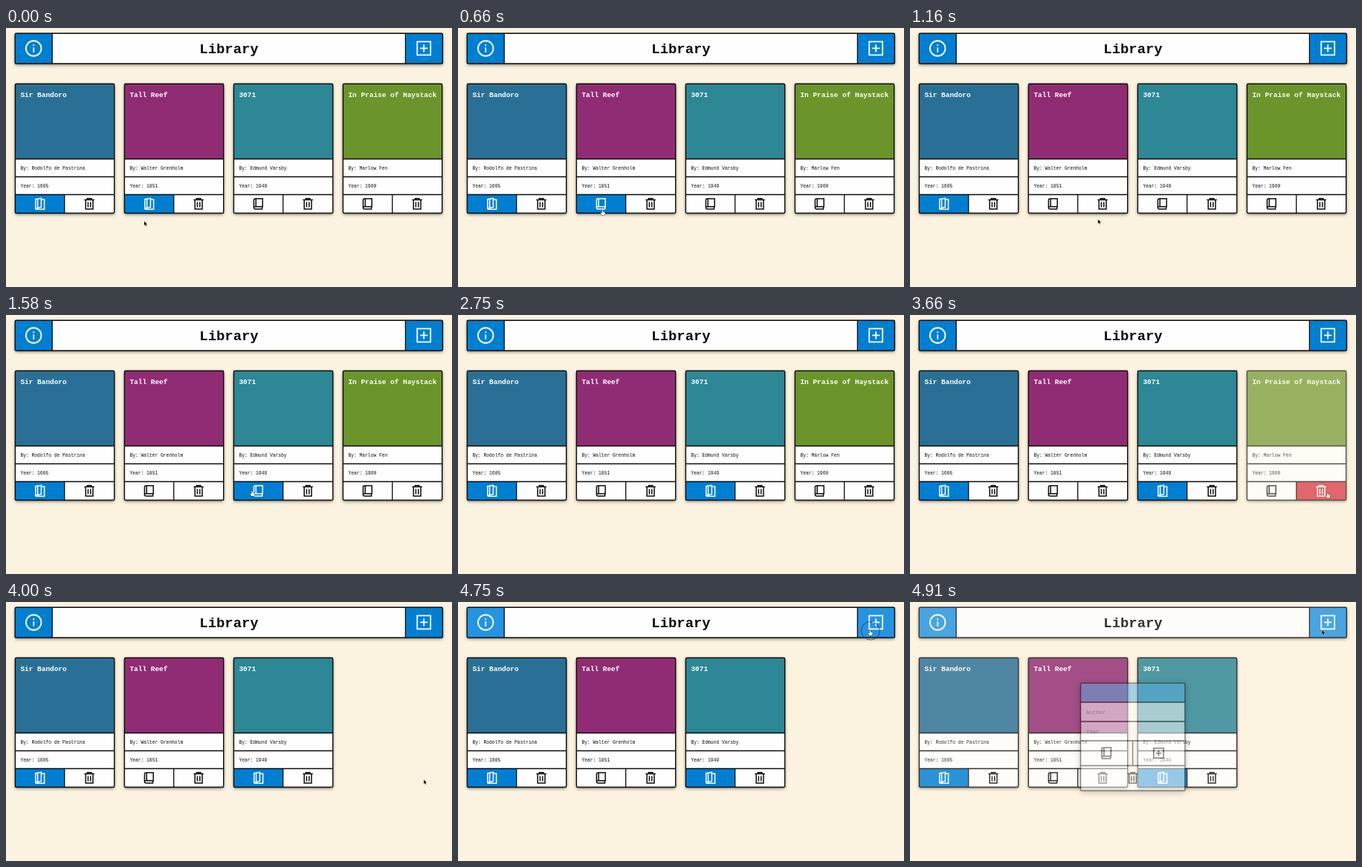
Animation, 600 px wide and 349 px high, one loop 4990 ms. Source, as an HTML page with a canvas:

```html
<!DOCTYPE html>
<html lang="en">
<head>
<meta charset="utf-8">
<title>Library</title>
<style>
  html, body { margin: 0; width: 100%; height: 100%; overflow: hidden; background: #fbf3df; }
  canvas { display: block; width: 600px; height: 349px; }
</style>
</head>
<body>
<canvas id="stage"></canvas>
<script>
const W = 600, H = 349, LOOP = 4990, STEP = LOOP / 60;
const PAPER = '#fbf3df', INK = '#0b0b0b';
const WHITE = [254, 254, 254], BLACK = [11, 11, 11];
const BLUE = [0, 127, 210], BRIGHT = [35, 148, 226], RED = [214, 40, 57];
const MONO = '"Liberation Mono", "Noto Sans Mono", monospace';
const dpr = window.devicePixelRatio || 1;

// Click times; the pointer ring shows for PRESS ms before each
const MARK_UNREAD = 575, MARK_READ = 1740, REMOVE = 3560, ADD = 4765;
const CLICKS = [MARK_UNREAD, MARK_READ, REMOVE - 80, ADD];
const PRESS = 90, FADE = 330;

// lit and open are the [from, to] times of the blue button and the open book
const books = [
  { title: 'Sir Bandoro', author: 'Rodolfo de Pastrina', year: 1605, color: '#2a7096', lit: [-LOOP, LOOP], open: [0, LOOP] },
  { title: 'Tall Reef', author: 'Walter Grenholm', year: 1851, color: '#902c73', lit: [-LOOP, 760], open: [0, MARK_UNREAD] },
  { title: '3071', author: 'Edmund Varsby', year: 1949, color: '#2d8795', lit: [1370, LOOP], open: [MARK_READ, LOOP] },
  { title: 'In Praise of Haystack', author: 'Marlow Fen', year: 1960, color: '#6b942b', removed: REMOVE }
];

const stops = [
  { x: 186, y: 260.5, from: 0, to: 90 },
  { x: 194.5, y: 245.5, from: 430, to: 670 },
  { x: 212, y: 269, from: 920, to: 920 },
  { x: 331, y: 237, from: 1540, to: 1830 },
  { x: 362, y: 280, from: 2160, to: 2250 },
  { x: 612, y: 258, from: 2700, to: 3080 },
  { x: 562, y: 239.5, from: 3400, to: 4080 },
  { x: 554.4, y: 38, from: 4580, to: LOOP }
];

const ICONS = {
  closedBook: 'M5.8 7H-4Q-6 7 -6 5V-5Q-6 -7 -4 -7H5.8V3.8H-4Q-6 3.8 -6 5.4M-3.2 -7V3.8M5.2 3.8V7',
  openBook: 'M-5.6 -6.2L2 -7.6V4.4L-5.6 6.2ZM-2.8 -6.4V5.2M-5.4 7.2H6.2V-5.8H2.4',
  trash: 'M-6.7 -5.4H6.7M-2.7 -5.4V-7.3H2.7V-5.4M-4.9 -5V7.1H4.9V-5M-1.7 -2.6V4.5M1.7 -2.6V4.5',
  plusBox: 'M-7 -7H7V7H-7ZM-4 0H4M0 -4V4',
  info: 'M-8 0A8 8 0 0 1 8 0A8 8 0 0 1 -8 0M0 -4.1V-2.5M0 -.9V4.1'
};
const ARROW = 'M0 0V5.4L1.3 4.3L2.2 6.4L3.2 6L2.3 3.9L4 3.8Z';
const HAND = 'M-.7 .2H.5L.8 2.4L3.2 3.1V5L2.4 7H-.8L-2.8 4L-2.2 3.4L-.7 4.2Z';

const clamp = v => Math.max(0, Math.min(1, v));
const ramp = (t, start, length) => clamp((t - start) / length);
const ease = v => v * v * (3 - 2 * v);
const mix = (a, b, k) => `rgb(${a.map((v, i) => Math.round(v + (b[i] - v) * k)).join()})`;

function makeLayer(canvas) {
  canvas.width = W * dpr;
  canvas.height = H * dpr;
  const c = canvas.getContext('2d');
  c.scale(dpr, dpr);
  return c;
}
const main = makeLayer(document.getElementById('stage'));
const modal = makeLayer(document.createElement('canvas'));

function box(c, x, y, w, h, fill) {
  c.fillStyle = fill;
  c.fillRect(x, y, w, h);
}

function rule(c, x, y, w, h) {
  c.beginPath();
  c.moveTo(x, y);
  c.lineTo(x + w, y + h);
  c.strokeStyle = INK;
  c.lineWidth = 1.3;
  c.stroke();
}

function text(c, str, x, y, size, color, weight = 400, align = 'left') {
  c.font = `${weight} ${size}px ${MONO}`;
  c.textAlign = align;
  c.fillStyle = color;
  c.fillText(str, x, y);
}

function drawPath(c, d, x, y, stroke, width, scale = 1, fill) {
  const path = new Path2D(d);
  c.save();
  c.translate(x, y);
  c.scale(scale, scale);
  c.strokeStyle = stroke;
  c.lineWidth = width / scale;
  c.stroke(path);
  if (fill) {
    c.fillStyle = fill;
    c.fill(path);
  }
  c.restore();
}

const icon = (c, name, x, y, color, scale = 1, width = 1.5) =>
  drawPath(c, ICONS[name], x, y, color, width, scale);

// White sheet with a shadow; the contents go between it and its outline
function panel(c, x, y, w, h, blur, contents) {
  const outline = new Path2D();
  outline.roundRect(x, y, w, h, 1.5);
  c.save();
  c.shadowColor = 'rgba(0,0,0,.5)';
  c.shadowBlur = blur * dpr;
  c.shadowOffsetY = 1.7 * dpr;
  c.fillStyle = mix(WHITE, WHITE, 0);
  c.fill(outline);
  c.restore();
  contents();
  c.strokeStyle = INK;
  c.lineWidth = 1.4;
  c.stroke(outline);
}

function header(t) {
  const c = main, x = 12.2, y = 7.2, w = 575.2, h = 40.8, side = 50;
  const blue = mix(BLUE, BRIGHT, ramp(t, 4470, 180));
  panel(c, x, y, w, h, 4, () => {
    for (const left of [x, x + w - side]) box(c, left, y, side, h, blue);
    for (const edge of [x + side, x + w - side]) rule(c, edge, y, 0, h);
  });
  text(c, 'Library', W / 2, 34, 18.9, INK, 700, 'center');
  icon(c, 'info', 37.2, 27.5, '#fff', 1.28, 1.8);
  icon(c, 'plusBox', 562.2, 27.4, '#fff', 1.28, 1.8);
}

function card(book, i, t) {
  const c = main, x = Math.floor(12 + i * 147.3) + 0.4, y = 75.2, w = 133.3, h = 174.3;
  const foot = 224.5, mid = x + 66.3;
  const gone = book.removed ? ramp(t, book.removed, FADE) : 0;
  if (gone === 1) return;

  const within = ([from, to]) => t >= from && t < to;
  const lit = book.lit ? ramp(t, book.lit[0], 150) - ramp(t, book.lit[1], 200) : 0;
  const danger = book.removed ? ramp(t, book.removed - 310, 150) : 0;
  const bookIcon = book.open && within(book.open) ? 'openBook' : 'closedBook';

  panel(c, x, y, w, h, 4, () => {
    box(c, x, y, w, 101.3, book.color);
    box(c, x, foot, mid - x, 25, mix(WHITE, BLUE, lit));
    box(c, mid, foot, x + w - mid, 25, mix(WHITE, RED, danger));
    for (let row = 0; row < 3; row++) rule(c, x, foot - 24 * row, w, 0);
    rule(c, mid, foot, 0, 25);
  });
  text(c, book.title, x + 7, 93, 9.45, '#fff', 700);
  text(c, 'By: ' + book.author, x + 7, 190.5, 6.3, INK);
  text(c, 'Year: ' + book.year, x + 7, 214.5, 6.3, INK);
  icon(c, bookIcon, x + 33, 237, mix(BLACK, WHITE, lit));
  icon(c, 'trash', x + 99.7, 237, mix(BLACK, WHITE, danger));

  if (gone) {
    c.globalAlpha = gone;
    box(c, x - 6, y - 6, w + 12, h + 16, PAPER);
    c.globalAlpha = 1;
  }
}

function paintModal() {
  const c = modal, x = 229.5, y = 109.4, w = 140.5, h = 144.8, mid = 299.6;
  panel(c, x, y, w, h, 9, () => {
    box(c, x, y, w, 26, mix(BLUE, WHITE, 0.36));
    for (let row = 0; row < 3; row++) rule(c, x, 135 + 26 * row, w, 0);
    rule(c, x, 220.5, w, 0);
    rule(c, mid, 187, 0, 33.5);
  });
  ['Author', 'Year'].forEach((label, i) => text(c, label, 237, 150.6 + 26 * i, 7.3, '#8a8a8a'));
  icon(c, 'closedBook', 264.3, 203.7, INK, 1.05);
  icon(c, 'plusBox', 334.5, 203.7, INK, 0.95);
  icon(c, 'trash', mid, 237, INK);
}

function pointerAt(t) {
  const i = stops.findIndex(s => t < s.from), end = stops.at(i), start = stops.at(i - 1);
  if (i < 0) return [end.x, end.y];
  const k = ease(ramp(t, start.to, end.from - start.to || 1));
  return [start.x + (end.x - start.x) * k, start.y + (end.y - start.y) * k];
}

function overButton(x, y, t) {
  if (t > ADD + 100) return false;
  if (y > 7 && y < 48) return x > 537 || x < 62;
  const column = (x - 12) / 147.3, i = Math.floor(column);
  const left = t > REMOVE + FADE ? 3 : 4;
  return y > 224.5 && y < 249.5 && column - i < 0.908 && i < left;
}

function pointer(t) {
  const c = main, [x, y] = pointerAt(t);
  if (CLICKS.some(click => t >= click - PRESS && t < click)) {
    c.beginPath();
    c.arc(x + 0.5, y + 0.8, 12.3, 0, 2 * Math.PI);
    c.strokeStyle = 'rgba(40,50,60,.8)';
    c.lineWidth = 0.9;
    c.stroke();
  }
  if (overButton(x, y, t)) drawPath(c, HAND, x, y, '#222', 0.9, 1, '#fff');
  else drawPath(c, ARROW, x, y, '#fff', 0.8, 1, '#000');
}

function render(now) {
  const t = Math.floor((now % LOOP) / STEP + 0.1) % 60 * STEP;
  box(main, 0, 0, W, H, PAPER);
  header(t);
  books.forEach((book, i) => card(book, i, t));
  const shown = ramp(t, ADD, 280);
  if (shown) {
    main.globalAlpha = shown / 3;
    box(main, 0, 0, W, H, PAPER);
    main.globalAlpha = shown;
    main.drawImage(modal.canvas, 0, 0, W, H);
    main.globalAlpha = 1;
  }
  pointer(t);
}

paintModal();
const start = performance.now();
function tick() {
  render(performance.now() - start);
  requestAnimationFrame(tick);
}
tick();
</script>
</body>
</html>
```
